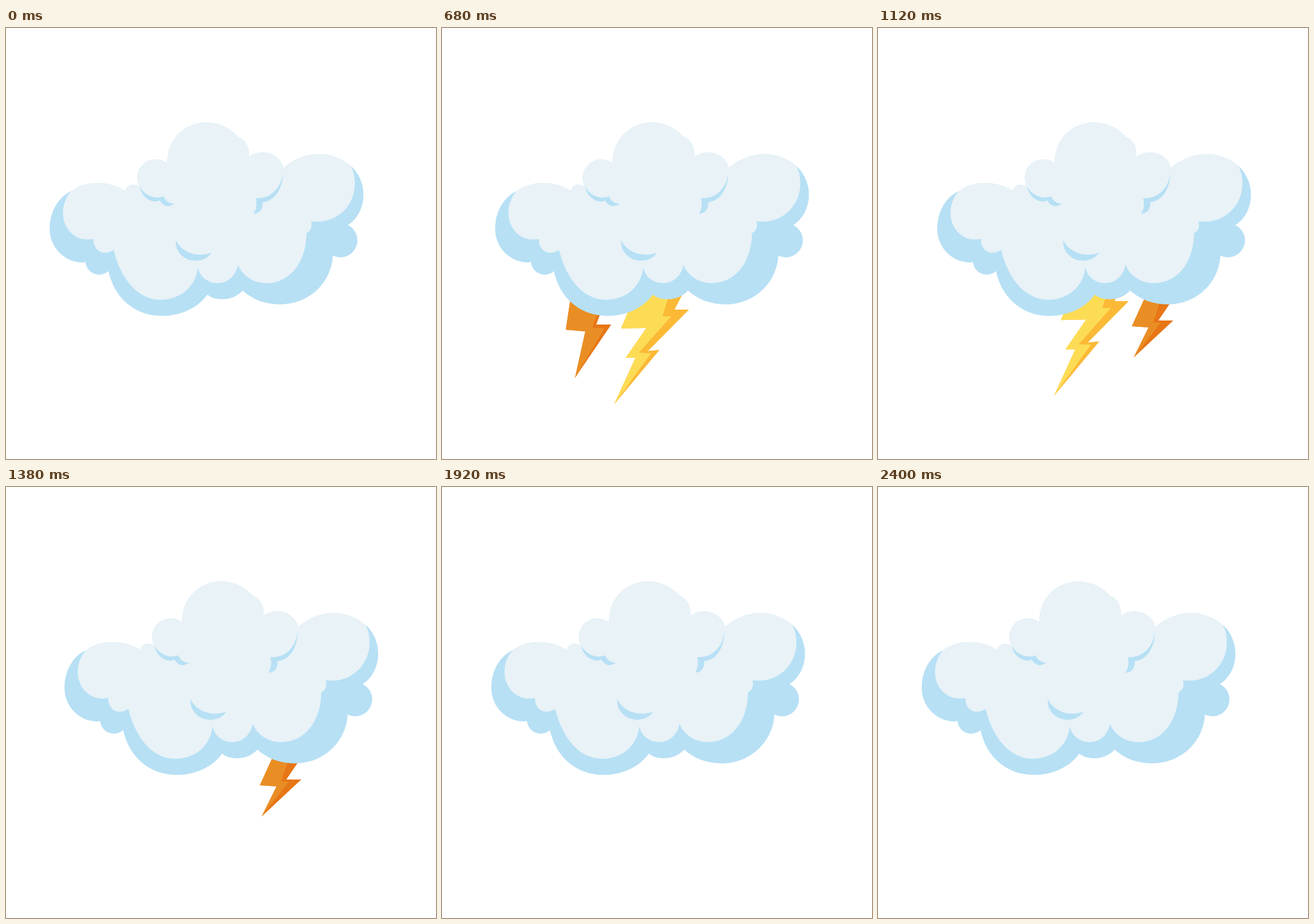
An HTML page that plays this animation: 747x750 px, repeating every 2420 ms.

```html
<!DOCTYPE html>
<html lang="en">
<head>
<meta charset="utf-8">
<title>Storm cloud</title>
<style>
html, body { margin: 0; width: 100%; height: 100%; overflow: hidden; background: #fff; }
svg { display: block; width: 100%; height: 100%; }
</style>
</head>
<body>
<svg viewBox="0 0 747 750">
  <g id="left">
    <path fill="#e77616" d="M228 440L215 525L249 528L231 609L294 516H268L296 440Z"/>
    <path fill="#e98e24" d="M228 440L215 525L249 528L231 609L282 523L261 521L292 440Z"/>
  </g>
  <g id="middle">
    <path fill="#fbb936" d="M346 440L311 523L355 522L319 574H336L299 655L378 560L358 562L429 490H404L430 440Z"/>
    <path fill="#fddc55" d="M346 440L311 523L355 522L319 574H336L299 655L363 566L342 565L398 502H383L402 440Z"/>
  </g>
  <g id="right">
    <path fill="#e77616" d="M477 440L441 519L470 521L444 573.500L513 509H487L534 440Z"/>
    <path fill="#e98e24" d="M477 440L441 519L470 521L444 573.500L491 513L478 512L503 440Z"/>
  </g>
  <g id="cloud">
    <path fill="#b7e0f5" d="M113 284C90 295 76 320 76 350C76 382 102 408 133 408Q136 408 138 407
      A24 24 0 0 0 178 423C188 470 224 501 271 501C303 501 332 488 350 464
      C357 470 366 472 376 472C390 472 403 466 411 457C428 472 450 481 476 481
      C525 481 565 445 568 396A29 29 0 1 0 594 343C611 332 621 312 621 290
      C621 270 612 251 599 240L560 260L350 330L150 300Z"/>
    <path fill="#e8f2f7" d="M113 284C125 274 142 269.500 160 269.500C178 269.500 195 275 207 283
      C209 276 214 272.500 220 272.500Q226 272 231 275A32.500 32.500 0 0 1 280 235
      C279 192 312 164 348 164C370 164 390 174 403 189C415 193 424 206 422 224
      C429 218 438 216 446 216C465 216 480 230 482 243C498 229 520 219 544 219
      C565 219 585 227 599 240C604 249 606 260 606 271C606 308 577 337 541 337
      Q534 337 530 336C532 345 530 354 522 357C522 405 495 444 452 444
      C431 444 411 432 403 412C400 430 386 444 368 444C350 444 336 432 333 416
      C331 448 304 473 269 473C226 473 198 432 187 386C183 389 177 391 171 391
      C160 391 151 380 152 367Q147 368 141 368C117 368 99 347 99 322
      C99 308 104 294 113 284Z"/>
    <path fill="#b7e0f5" d="M232 276C235 291 247 302 260 302Q264 302 267 300C270 306 276 310 281 310
      Q288 309 293 306C284 306 276 300 274 293Q268 295 262 295C249 294 239 288 232 276Z
      M481 251C481 278 468 301 446 303C447 316 440 323 430 323C435 316 436 306 434 296C455 298 478 283 481 251Z
      M295 369C293 390 310 405 329 405C341 405 351 400 357 391C333 400 305 391 295 369Z"/>
  </g>
</svg>
<script>
const LOOP = 2420, STEP = 20, HALF = 1200, DRIFT = 27.3, SLIDE = 120;

// hide: offset that tucks a bolt behind the cloud; shows: [start, end] in ms
const bolts = [
  { id: "left", hide: [30, -150], shows: [[180, 1060]] },
  { id: "middle", hide: [90, -200], shows: [[560, 820], [1020, 1280]] },
  { id: "right", hide: [44, -104], shows: [[860, 1540]] }
];

const el = id => document.getElementById(id);
const clamp = v => Math.max(0, Math.min(1, v));
const smooth = v => v * v * (3 - 2 * v);
const move = (node, x, y) => node.setAttribute("transform", `translate(${x.toFixed(2)} ${y.toFixed(2)})`);

function extent(t, [start, end]) {
  return smooth(clamp(Math.min(t - start, end - t) / SLIDE));
}

function draw(t) {
  const drift = clamp(1 - Math.abs(t - HALF) / HALF);
  move(el("cloud"), DRIFT * smooth(drift), 0);
  for (const { id, hide, shows } of bolts) {
    const node = el(id);
    const out = Math.max(...shows.map(s => extent(t, s)));
    node.style.display = out > 0 ? "" : "none";
    move(node, hide[0] * (1 - out), hide[1] * (1 - out));
  }
}

const begin = performance.now();
function tick() {
  const t = (performance.now() - begin) % LOOP;
  draw(Math.floor(t / STEP) * STEP);
  requestAnimationFrame(tick);
}
tick();
</script>
</body>
</html>
```
